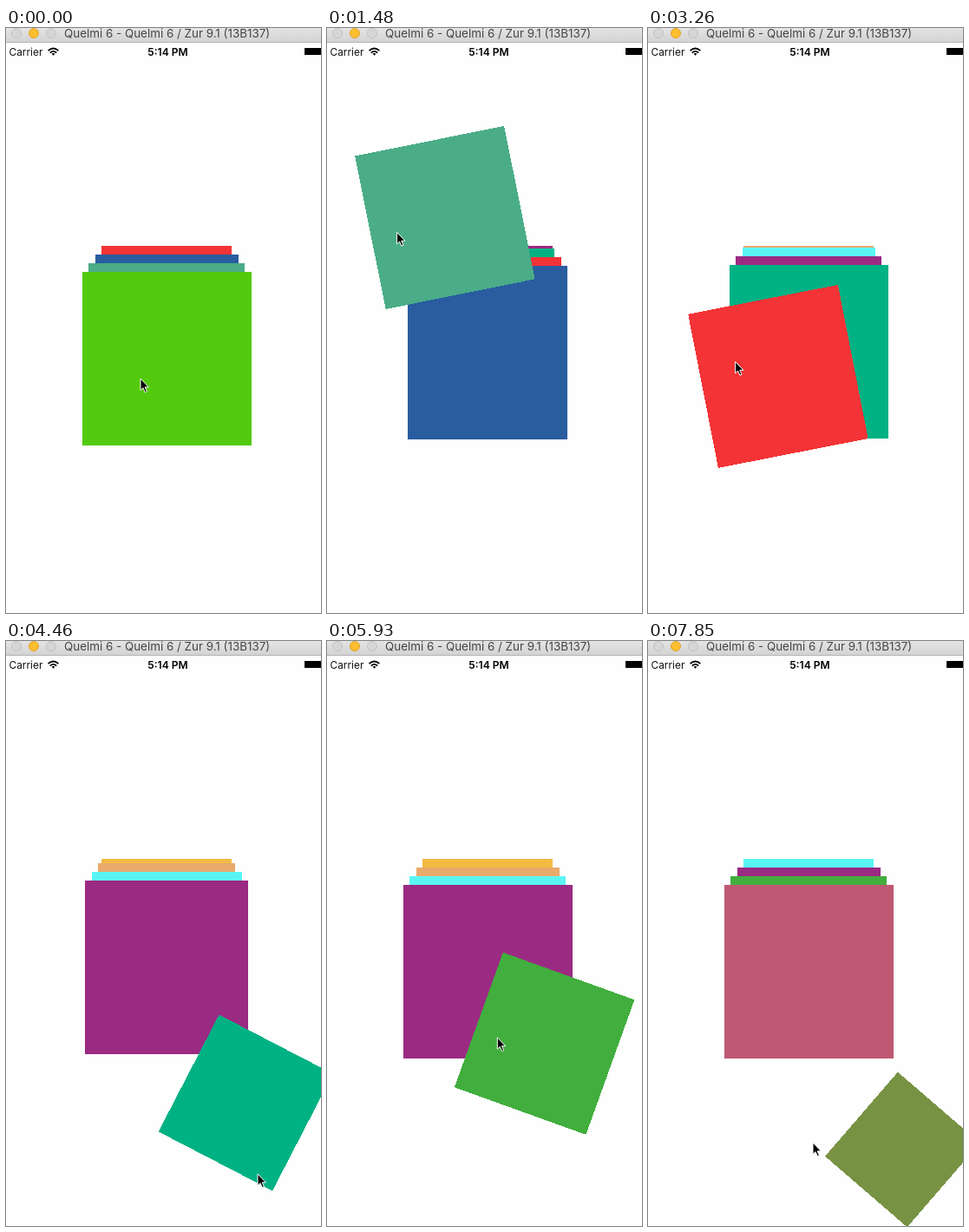
An HTML page for the animation above (8 s loop, 363 by 674 pixels).

```html
<!DOCTYPE html>
<html lang="en">
<head>
<meta charset="utf-8">
<title>Card stack</title>
<style>
  html, body { margin: 0; width: 100%; height: 100%; overflow: hidden; background: #fefefe; }
  svg { display: block; width: 363px; height: 674px; }
  text { font-family: Inter, "Liberation Sans", sans-serif; }
  #cards { shape-rendering: crispEdges; }
</style>
</head>
<body>
<svg viewBox="0 0 363 674">
  <defs>
    <linearGradient id="bar" x2="0" y2="1">
      <stop stop-color="#e4e4e4"/><stop offset="1" stop-color="#d3d3d3"/>
    </linearGradient>
  </defs>
  <rect width="363" height="674" fill="#fefefe"/>
  <g id="cards"></g>

  <text x="3.5" y="31.5" font-size="11.9" fill="#111">Carrier</text>
  <g fill="none" stroke="#000" stroke-width="1.8">
    <path d="M48.6 26.2Q54.5 20.8 60.4 26.2M50.8 28.6Q54.5 25.2 58.2 28.6"/>
    <path d="M54.5 31.8L52.5 29.6Q54.5 28.2 56.5 29.6Z" fill="#000" stroke="none"/>
  </g>
  <text x="186.5" y="31.5" font-size="12.1" font-weight="600" text-anchor="middle">5:14 PM</text>
  <rect x="344" y="23" width="20" height="8"/>

  <rect width="363" height="16" fill="url(#bar)"/>
  <rect y="16" width="363" height="1" fill="#b4b4b4"/>
  <circle cx="12" cy="6" r="5.5" fill="#d6d6d6" stroke="#c2c2c2"/>
  <circle cx="32" cy="6" r="5.5" fill="#fdbe30" stroke="#e2a32c"/>
  <circle cx="52" cy="6" r="5.5" fill="#d6d6d6" stroke="#c2c2c2"/>
  <text x="67" y="11" font-size="13.4" fill="#454545">Quelmi 6 - Quelmi 6 / Zur 9.1 (13B137)</text>

  <path id="cursor" d="M1 1V14.4L4 11.6L6.3 16.7L8.4 15.8L6.2 10.8H10.4Z"
        fill="#000" stroke="#fff" stroke-width="1"/>
</svg>
<script>
const LOOP = 8000, STEPS = 54;
const VISIBLE = 4;        // cards shown in the stack
const FULL_DRAG = 170;    // sideways distance that brings the next card to the front
const RETURN_STEPS = 5;   // time a returning card takes to reach the stack
const PUSH_STEPS = 3;     // time the stack takes to make room for it

// Back to front. Each moving card starts at a step and passes one held pose;
// grab is where the pointer sits on the card at rest.
const cards = [
  { slot: 8, color: '#f2bb43' },
  { slot: 7, color: '#e8aa6b' },
  { slot: 6, color: '#5af5f3' },
  { slot: 5, color: '#9b2a82' },
  { slot: 4, color: '#00b184', start: 28, held: { step: 30, x: 91, y: 151, angle: 27.4 }, grab: [198, 462] },
  { slot: 3, color: '#f33336', start: 21, held: { step: 22, x: -35.4, y: 20.4, angle: -11.1 }, grab: [135, 363] },
  { slot: 2, color: '#295d9f', start: 14, held: { step: 16, x: 110, y: -90, angle: 22 }, grab: [140, 380] },
  { slot: 1, color: '#4aad87', start: 8, held: { step: 10, x: -49.4, y: -162.6, angle: -11.4 }, grab: [129, 397] },
  { slot: 0, color: '#54ca0e', start: 1, held: { step: 3, x: -75, y: 90, angle: -20 }, grab: [154, 403] },
  { slot: 4, color: '#41ae3e', returns: true, start: 38, held: { step: 40, x: 65.3, y: 82.8, angle: 19.8 }, grab: [130, 373] },
  { slot: 3, color: '#bf5872', returns: true, start: 47, held: { step: 47, x: 88, y: 177, angle: 30.7 }, grab: [126, 364] },
  { slot: 2, color: '#789243', returns: true, start: 52, held: { step: 53, x: 108, y: 205, angle: 40.8 }, grab: [81, 372] }
];
const moving = cards.filter(card => card.held);

const clamp = (v, lo, hi) => Math.max(lo, Math.min(hi, v));
const arrival = card => card.start + RETURN_STEPS;

// Distance from the stack, where 1 is the held pose: throws speed up, returns are even.
function reach({ start, held, returns }, step) {
  if (!returns) return (Math.max(0, step - start) / (held.step - start)) ** 1.4;
  const end = start + RETURN_STEPS;
  return Math.max(0, end - step) / (end - held.step);
}

// How many cards the stack has moved forward because of this card.
function advance(card, step) {
  if (card.returns) return -clamp((step - arrival(card) + 2) / PUSH_STEPS, 0, 1);
  return Math.min(1, Math.abs(card.held.x) * reach(card, step) / FULL_DRAG);
}

// The pointer drags each card along, then travels to the next grab point.
const stops = moving.flatMap(card => {
  const { held, grab: [x, y] } = card;
  const away = { step: held.step, x: x + held.x, y: y + held.y };
  return card.returns
    ? [away, { step: arrival(card), x, y }]
    : [{ step: card.start, x, y }, away];
}).sort((a, b) => a.step - b.step);

function pointerAt(step) {
  const next = stops.findIndex(stop => stop.step > step);
  const b = stops[next], a = stops[next - 1] || b;
  const k = a === b ? 0 : (step - a.step) / (b.step - a.step);
  return [a.x + (b.x - a.x) * k, a.y + (b.y - a.y) * k];
}

const layer = document.getElementById('cards');
const pointer = document.getElementById('cursor');

function setAttributes(element, attributes) {
  for (const name in attributes) element.setAttribute(name, attributes[name]);
}

for (const card of cards) {
  card.rect = document.createElementNS(layer.namespaceURI, 'rect');
  setAttributes(card.rect, { fill: card.color, y: -100, height: 200 });
  layer.append(card.rect);
}

function placeCard(card, front, step) {
  const depth = card.slot - front;
  const waiting = card.returns && step < card.start;
  card.rect.style.display = waiting || depth >= VISIBLE ? 'none' : '';

  const level = clamp(depth, 0, VISIBLE - 1);
  const width = 195 - 15 * level;
  const { x, y, angle } = card.held || { x: 0, y: 0, angle: 0 };
  const amount = card.held ? reach(card, step) : 0;
  const turn = clamp(angle * amount, -45, 45);
  const scale = 1 - .0088 * Math.abs(turn);
  setAttributes(card.rect, {
    x: -width / 2,
    width,
    transform: `translate(${185.3 + x * amount} ${381 - 10 * level + y * amount}) rotate(${turn}) scale(${scale})`
  });
}

function draw(now) {
  // The picture advances in even steps; the offset absorbs timer rounding.
  const step = Math.min(STEPS - 1, Math.floor((now % LOOP + 9) * STEPS / LOOP));
  const front = moving.reduce((sum, card) => sum + advance(card, step), 0);
  for (const card of cards) placeCard(card, front, step);
  pointer.setAttribute('transform', `translate(${pointerAt(step)})`);
}

const begin = performance.now();
function tick() {
  draw(performance.now() - begin);
  requestAnimationFrame(tick);
}
tick();
</script>
</body>
</html>
```
